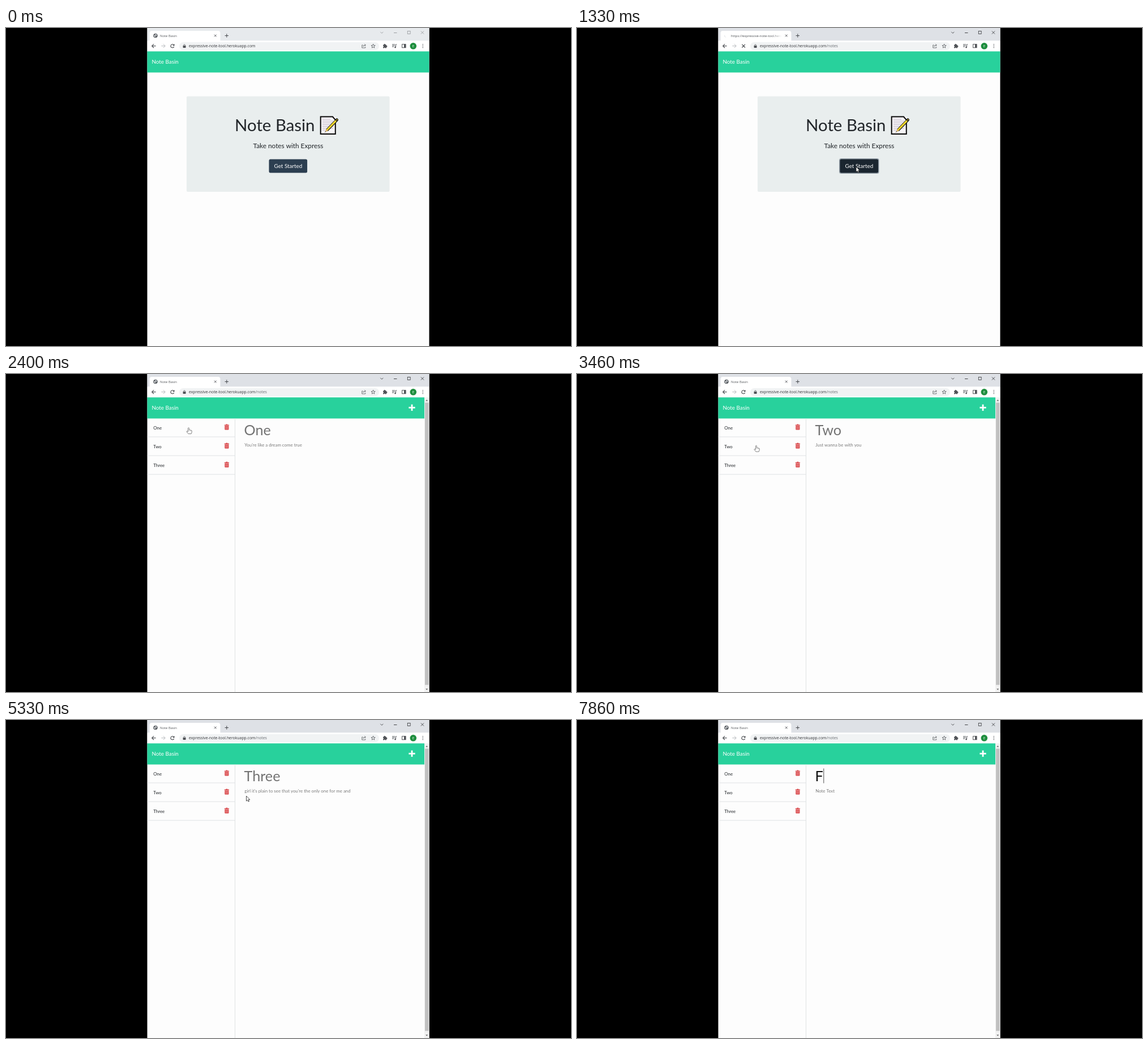
Animation, 998 px wide and 561 px high, one loop 8 s. Source, as an HTML page with a canvas:

```html
<!DOCTYPE html>
<html lang="en">
<head>
<meta charset="utf-8">
<title>Note Basin</title>
<style>
html, body { margin: 0; width: 100%; height: 100%; overflow: hidden; background: #000; }
canvas { display: block; }
</style>
</head>
<body>
<canvas id="stage" width="998" height="561"></canvas>
<script>
const ctx = document.getElementById('stage').getContext('2d');
const LOOP = 8000;
const APP = 'Note Basin';
const LATO = 'Lato, sans-serif';
const UI = '"Open Sans", sans-serif';
const ACTIVATE = 1000, LOADED = 1600, HOVER = 870;

// Pointer path: time, x, y, pointer kind on the way to the next stop
const pointerStops = [
  [130, 250, 284, 'arrow'], [870, 493, 245, 'arrow'], [1860, 493, 245, 'arrow'],
  [2200, 340, 105, 'hand'], [2330, 322.5, 94.5, 'hand'], [3060, 322.5, 94.5, 'hand'],
  [3400, 316.5, 126, 'hand'], [4400, 316.5, 126, 'hand'], [4800, 312, 159, 'hand'],
  [5200, 312, 159, 'hand'], [5330, 424.5, 134, 'arrow'], [5600, 650, 76, 'hand'],
  [5800, 717, 57, 'hand'], [6660, 717, 57, 'arrow'], [7000, 470, 100, 'arrow']
];

// Note panel contents: time, title, body
const notes = [
  [LOADED, 'Note Title', 'Note Text'],
  [2330, 'One', "You're like a dream come true"],
  [3460, 'Two', 'Just wanna be with you'],
  [4860, 'Three', "girl it's plain to see that you're the only one for me and"],
  [5860, 'Note Title', 'Note Text'],
  [7800, 'F', 'Note Text']
];

function box(x, y, w, h, color, radius = 0) {
  ctx.fillStyle = color;
  ctx.beginPath();
  ctx.roundRect(x, y, w, h, radius);
  ctx.fill();
}

function text(str, x, y, size, color, family = LATO, align = 'left') {
  ctx.font = `${size}px ${family}`;
  ctx.textAlign = align;
  ctx.fillStyle = color;
  ctx.fillText(str, x, y);
}

function line(color, width, ...points) {
  ctx.strokeStyle = color;
  ctx.lineWidth = width;
  ctx.beginPath();
  points.forEach(([x, y], i) => i ? ctx.lineTo(x, y) : ctx.moveTo(x, y));
  ctx.stroke();
}

function shape(fill, ...points) {
  ctx.fillStyle = fill;
  ctx.beginPath();
  points.forEach(([x, y]) => ctx.lineTo(x, y));
  ctx.closePath();
  ctx.fill();
}

function disc(x, y, r, color) {
  ctx.fillStyle = color;
  ctx.beginPath();
  ctx.arc(x, y, r, 0, Math.PI * 2);
  ctx.fill();
}

function arc(x, y, r, from, to, color, width) {
  ctx.strokeStyle = color;
  ctx.lineWidth = width;
  ctx.beginPath();
  ctx.arc(x, y, r, from, to);
  ctx.stroke();
}

function cross(x, y, r, color, width) {
  line(color, width, [x - r, y - r], [x + r, y + r]);
  line(color, width, [x + r, y - r], [x - r, y + r]);
}

function plus(x, y, r, color, width) {
  line(color, width, [x - r, y], [x + r, y]);
  line(color, width, [x, y - r], [x, y + r]);
}

function frame(x, y, w, h, color, width) {
  ctx.strokeStyle = color;
  ctx.lineWidth = width;
  ctx.strokeRect(x, y, w, h);
}

function globe(x, y) {
  disc(x, y, 3.8, '#5f6368');
  shape('#eceef0', [x - 2.8, y - 1], [x - 0.6, y - 0.2], [x - 0.2, y + 2.8], [x - 2, y + 1.6]);
  shape('#eceef0', [x, y - 2.8], [x + 2.3, y - 1.4], [x + 1.2, y + 0.4], [x - 0.5, y - 1]);
}

function tabStrip(t, loading) {
  const active = t >= ACTIVATE;
  const ctl = active ? '#303134' : '#929599';
  box(249.5, 0, 498, 22.5, active ? '#dee1e6' : '#e7eaed');
  box(253.5, 5, 125, 18, '#fff', [4, 4, 0, 0]);
  if (loading) {
    const turn = t / 160;
    arc(264, 13.5, 3.3, turn, turn + 1.3, '#d5d8dc', 0.8);
    ctx.save();
    ctx.beginPath();
    ctx.rect(270, 5, 92, 16);
    ctx.clip();
    const fade = ctx.createLinearGradient(345, 0, 362, 0);
    fade.addColorStop(0, '#4c4f53');
    fade.addColorStop(1, '#fff');
    text('https://expressive-note-tool.herokuapp.com', 272, 15.7, 5.9, fade, UI);
    ctx.restore();
  } else {
    globe(264, 13.5);
    text(APP, 272, 15.7, 5.9, '#54575b', UI);
  }
  cross(369.8, 13.5, 1.9, '#45484c', 0.9);
  plus(389.8, 13.5, 3.2, '#45484c', 1);
  line(ctl, 0.8, [661.3, 6.8], [663.8, 9.3], [666.3, 6.8]);
  line(ctl, 0.9, [685, 8.5], [690.5, 8.5]);
  frame(709.3, 5.5, 4.8, 4.8, ctl, 0.8);
  cross(735.5, 8, 2.6, ctl, 0.8);
}

function toolbar(t, loading) {
  const ink = '#505357';
  box(249.5, 22.5, 498, 19, '#fff');
  line('#45484c', 1.1, [264.7, 31.7], [257.8, 31.7]);
  line('#45484c', 1.1, [261, 28.4], [257.7, 31.7], [261, 35]);
  line('#b6b9bd', 1, [274.3, 31.7], [281, 31.7]);
  line('#b6b9bd', 1, [277.9, 28.4], [281.2, 31.7], [277.9, 35]);
  if (loading) cross(294.2, 31.7, 2.8, '#45484c', 1.1);
  else {
    arc(294, 31.8, 3, 0.4, 5.5, '#45484c', 1.1);
    shape('#45484c', [297.6, 27.9], [297.6, 31.3], [294.2, 31.3]);
  }
  box(306, 25, 353, 14, '#f1f3f4', 7);
  box(312.6, 30.9, 5, 4, ink, 0.6);
  arc(315.1, 30.6, 1.5, Math.PI, 0, ink, 0.8);
  const host = 'expressive-note-tool.herokuapp.com';
  text(host, 323, 34.2, 6.87, '#303236', UI);
  if (t >= ACTIVATE) text('/notes', 323 + ctx.measureText(host).width, 34.2, 6.87, '#686c71', UI);

  line(ink, 0.8, [630.5, 30], [628.8, 30], [628.8, 35], [634.8, 35], [634.8, 33.2]);
  line(ink, 0.8, [630.8, 33], [631.5, 31], [635, 30.2]);
  line(ink, 0.8, [633.4, 28.4], [635.4, 30.2], [633.4, 32]);

  ctx.strokeStyle = ink;
  ctx.lineWidth = 0.8;
  ctx.beginPath();
  for (let i = 0; i < 10; i++) {
    const r = i % 2 ? 1.6 : 3.8, a = i * Math.PI / 5 - Math.PI / 2;
    ctx.lineTo(648.6 + r * Math.cos(a), 32 + r * Math.sin(a));
  }
  ctx.closePath();
  ctx.stroke();

  box(666, 29.5, 6, 6, ink, 0.8);
  disc(668.9, 29.2, 1.3, ink);
  disc(672.1, 32.4, 1.3, ink);
  disc(666.2, 32.6, 0.9, '#fff');
  disc(669, 35.4, 0.9, '#fff');

  [29, 31, 33].forEach((y, i) => line(ink, 0.9, [682, y], [i < 2 ? 687.2 : 685, y]));
  line(ink, 0.9, [688.5, 34], [688.5, 29], [690.3, 29]);
  disc(687.5, 34.1, 1.3, ink);
  frame(699.6, 28.7, 6.4, 6, ink, 1);
  box(703, 28.5, 3.2, 6.4, ink);
  disc(719.3, 31.8, 5.8, '#1e8e3e');
  text('E', 719.3, 34, 6, '#fff', UI, 'center');
  [29, 31.8, 34.6].forEach(y => disc(736.3, y, 0.75, '#45484c'));
}

function memoIcon() {
  box(555.7, 156.5, 26.3, 30.5, '#f7f5f8');
  ctx.lineJoin = 'miter';
  ctx.strokeStyle = '#090909';
  ctx.lineWidth = 2;
  ctx.beginPath();
  ctx.moveTo(577, 156.5);
  ctx.lineTo(555.7, 156.5);
  ctx.lineTo(555.7, 187);
  ctx.lineTo(581.8, 187);
  ctx.lineTo(581.8, 162);
  ctx.closePath();
  ctx.stroke();
  for (let i = 0; i < 7; i++) {
    line('#b9aebe', 0.9, [558.8, 161 + i * 3.2], [i < 1 ? 573 : i < 6 ? 578 : 566, 161 + i * 3.2]);
  }
  ctx.lineCap = 'round';
  line('#141414', 5, [568, 179.2], [584.5, 162]);
  line('#f4d52c', 3.2, [567, 180], [582, 164.4]);
  line('#f4d52c', 1.6, [584.4, 162], [584.8, 161.6]);
  ctx.lineCap = 'butt';
  shape('#dfb764', [564, 183.4], [565.6, 178.6], [568.6, 181.3]);
  line('#161616', 1, [563, 184.2], [565, 182.2]);
}

function homePage(t) {
  box(249.5, 41.3, 498, 37.2, '#28d19c');
  text(APP, 257.5, 63.3, 9.84, '#fff');
  box(319, 120.5, 358.5, 168.5, '#e9eeee', 2);
  text(APP, 404, 182, 29.4, '#212529');
  memoIcon();
  text('Take notes with Express', 498.5, 212, 11.8, '#212529', LATO, 'center');
  if (t >= ACTIVATE) box(463, 230, 70.6, 27, '#929da6', 3.5);
  box(464.5, 231.5, 67.6, 24, t >= ACTIVATE ? '#1a252f' : t >= HOVER ? '#1e2b37' : '#2c3e50', 2.5);
  text('Get Started', 498.4, 246.9, 9.84, '#fff', LATO, 'center');
}

function trash(x, y) {
  const red = '#d9484b';
  box(x - 4.2, y - 4, 8.4, 1.3, red, 0.4);
  box(x - 1.5, y - 5, 3, 1.5, red, 0.4);
  box(x - 3.6, y - 2.2, 7.2, 7.2, red, [0, 0, 1, 1]);
  [-1.8, 0, 1.8].forEach(dx => line('#f3b9ba', 0.6, [x + dx, y - 1], [x + dx, y + 3.8]));
}

function notesPage(t) {
  box(249.5, 41.3, 489.5, 37.2, '#28d19c');
  text(APP, 257.5, 63.3, 9.84, '#fff');
  plus(717, 59.3, 5.6, '#fff', 2.8);
  box(739, 41.3, 8.5, 520, '#f1f1f1');
  box(740, 50.5, 6.5, 498, '#c1c1c1');
  shape('#606060', [741.2, 47.4], [743.2, 45.2], [745.2, 47.4]);
  shape('#606060', [741.2, 555.2], [743.2, 557.4], [745.2, 555.2]);

  ['One', 'Two', 'Three'].forEach((name, i) => {
    const y = 94.8 + i * 33.1;
    text(name, 260.3, y + 2.9, 7.87, '#212529');
    trash(389.9, y - 1.3);
    line('#dcdfe1', 0.9, [249.5, y + 16.1], [404.5, y + 16.1]);
  });
  line('#dcdfe1', 0.9, [404.5, 78.5], [404.5, 561]);

  const [, title, body] = notes.findLast(n => t >= n[0]);
  const typed = t >= 7800;
  text(title, 420.5, 107.7, 25.2, typed ? '#111' : '#737373');
  if (t >= 7330) {
    const caret = typed ? 421.2 + ctx.measureText(title).width : 421.5;
    box(caret, 85.5, 0.8, 26, '#222');
  }
  text(body, 421.3, 127.8, 7.87, '#7b7b7b');
}

function pointer(t) {
  const i = pointerStops.findLastIndex(s => t >= s[0]);
  if (i < 0 || i === pointerStops.length - 1) return;
  const [t0, x0, y0, kind] = pointerStops[i];
  const [t1, x1, y1] = pointerStops[i + 1];
  const p = (t - t0) / (t1 - t0), ease = p * p * (3 - 2 * p);
  ctx.save();
  ctx.translate(x0 + (x1 - x0) * ease, y0 + (y1 - y0) * ease);
  const outline = new Path2D(kind === 'hand'
    ? 'M-1 .8Q0-.6 1 .8V4.2Q2 3.5 2.8 4.5Q3.8 4 4.4 5Q5.7 4.6 5.7 6V8.4L4.6 11H-.5L-3.5 7.3Q-3.4 5.6-1.8 6.6L-1 7.4Z'
    : 'M0 0V9L2.1 7.1L3.5 10.1L5 9.4L3.6 6.5H6.3Z');
  ctx.lineJoin = 'round';
  ctx.fillStyle = '#fff';
  ctx.strokeStyle = kind === 'hand' ? '#626262' : '#222';
  ctx.lineWidth = 0.8;
  ctx.fill(outline);
  ctx.stroke(outline);
  if (kind === 'hand') {
    line('#929292', 0.5, [1, 4.2], [1, 6.2]);
    line('#929292', 0.5, [2.8, 4.5], [2.8, 6.4]);
    line('#929292', 0.5, [4.4, 5], [4.4, 6.6]);
  }
  ctx.restore();
}

function draw(now) {
  const t = now % LOOP;
  const loading = t >= ACTIVATE && t < LOADED;
  box(0, 0, 998, 561, '#000');
  box(249.5, 0, 498, 561, '#fdfdfd');
  tabStrip(t, loading);
  toolbar(t, loading);
  if (t < LOADED) homePage(t);
  else notesPage(t);
  pointer(t);
}

const start = performance.now();
function tick() {
  draw(performance.now() - start);
  requestAnimationFrame(tick);
}
tick();
</script>
</body>
</html>
```
